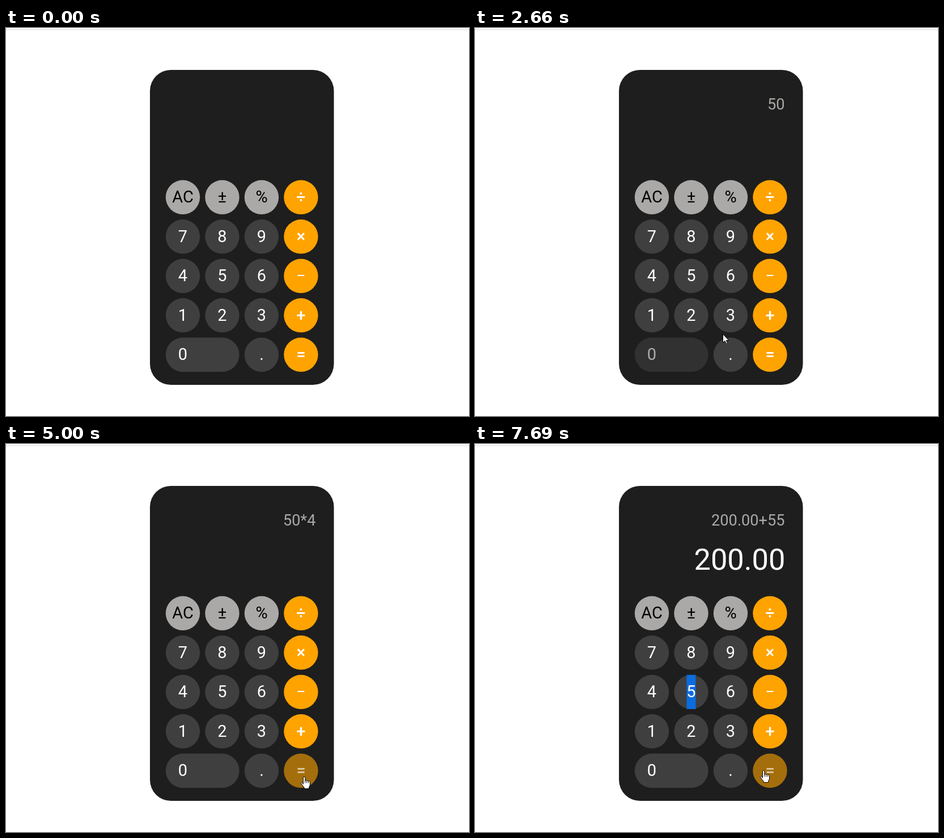
An HTML page with a canvas for the animation above (8000 ms loop, 817x685 px).

```html
<!DOCTYPE html>
<html lang="en">
<head>
<meta charset="utf-8">
<title>Calculator</title>
<style>
  html, body { margin: 0; width: 100%; height: 100%; overflow: hidden; background: #fff; }
  canvas { display: block; }
</style>
</head>
<body>
<canvas id="stage" width="817" height="685"></canvas>
<script>
const ctx = document.getElementById('stage').getContext('2d');
const LOOP = 8000;
const FONT = 'Roboto, Arial, sans-serif';
const ORANGE = '#ffa300', GRAY = '#aaa9a7', DARK = '#3f3f3f', BODY = '#1e1e1e';
const SIZE = 60.4, PITCH = 69.5, LEFT = 281.8, TOP = 268.6;

const ROWS = ['A±%÷', '789×', '456−', '123+', '0 .='];
const keys = [];
ROWS.forEach((line, row) => [...line].forEach((id, col) => {
  if (id === ' ') return;
  const kind = col === 3 ? 'op' : row === 0 ? 'fn' : 'num';
  keys.push({ id, kind, x: LEFT + col * PITCH, y: TOP + row * PITCH,
    w: id === '0' ? SIZE + PITCH : SIZE });
}));

// time, pointer shape, hotspot x, y, hovered key, pressed key
const POINTER = [
  [0, '', 0, 0],
  [330, 'arrow', 491, 529],
  [660, 'arrow', 410, 446],
  [1000, 'hand', 378, 430, '5'],
  [1330, 'hand', 378, 430, '', '5'],
  [1660, 'hand', 369, 560, '0'],
  [1990, 'hand', 369, 567, '0'],
  [2330, 'hand', 369, 567, '', '0'],
  [2660, 'arrow', 437, 540, '0'],
  [2990, 'hand', 521, 430, '−'],
  [3340, 'hand', 534, 370, '', '×'],
  [3670, 'arrow', 462, 401],
  [4010, 'arrow', 433, 403],
  [4340, 'hand', 319, 437, '4'],
  [4660, 'hand', 320, 441, '4'],
  [5000, 'hand', 526, 587, '='],
  [5350, 'hand', 529, 590, '='],
  [5690, 'hand', 509, 557, '='],
  [6020, 'hand', 508, 517, '+'],
  [6350, 'hand', 517, 507, '+'],
  [6690, 'hand', 450, 494, '3'],
  [7030, 'hand', 369, 433, '5'],
  [7360, 'hand', 369, 433, '', '5'],
  [7690, 'hand', 509, 576, '=']
];
const ENTRY = [
  [0, ''], [1660, '5'], [2660, '50'], [3670, '50*'], [4660, '50*4'],
  [5350, '200.00'], [6690, '200.00+'], [7360, '200.00+5'], [7690, '200.00+55']
];
const RESULT = [[0, ''], [5350, '200.00']];
const SELECT_AT = 7360;

const ARROW = new Path2D('M.5 .5V15.5L4 12.3L6.4 17.5L8.6 16.5L6.3 11.5H10.8Z');
const HAND = new Path2D('M4.5 13.5V2a1.7 1.7 0 0 1 3.4 0V7.5a1.5 1.5 0 0 1 2.9 .6' +
  'a1.5 1.5 0 0 1 2.9 .6a1.5 1.5 0 0 1 2.8 .8V14q0 3-1.8 4.8V21.5H6.2V19.5L1 13' +
  'q-1-1.8 .6-2.4q1.2-.4 2.9 2.9z');
const KNUCKLES = new Path2D('M7.9 7V11.5M10.8 8V11.5M13.7 9V11.5');

const at = (list, t) => list.findLast(step => step[0] <= t);

function box(x, y, w, h, r, color) {
  ctx.fillStyle = color;
  ctx.beginPath();
  ctx.roundRect(x, y, w, h, r);
  ctx.fill();
}

function text(str, x, y, size, color, align, weight = 400) {
  ctx.font = `${weight} ${size}px ${FONT}`;
  ctx.textAlign = align;
  ctx.fillStyle = color;
  ctx.fillText(str, x, y);
}

function keyColor(kind, down) {
  if (kind === 'num') return down ? ORANGE : DARK;
  return kind === 'op' && !down ? ORANGE : GRAY;
}

function drawKey(key, over, down, selected) {
  const { id, kind, x, y, w } = key;
  const cx = x + SIZE / 2;
  ctx.globalAlpha = over ? 0.6 : 1;
  box(x, y, w, SIZE, SIZE / 2, keyColor(kind, down));
  if (selected) {
    ctx.fillStyle = '#0b6cdf';
    ctx.fillRect(cx - 8, y, 16, SIZE);
  }
  const weight = kind === 'op' && id !== '−' ? 500 : 400;
  text(id === 'A' ? 'AC' : id, cx, y + SIZE / 2 + 9.6, 29,
    kind === 'fn' ? '#000' : '#fff', 'center', weight);
  ctx.globalAlpha = 1;
}

function drawPointer(shape, x, y, down) {
  if (!shape) return;
  if (down) box(x - 15, y - 15, 29, 29, 14.5, 'rgba(255,240,0,.55)');
  const hand = shape === 'hand';
  const path = hand ? HAND : ARROW;
  ctx.save();
  ctx.translate(hand ? x - 6 : x, y);
  ctx.fillStyle = '#fff';
  ctx.strokeStyle = '#000';
  ctx.lineWidth = 1;
  ctx.fill(path);
  ctx.stroke(path);
  if (hand) ctx.stroke(KNUCKLES);
  ctx.restore();
}

function draw(t) {
  const [, shape, x, y, over, down] = at(POINTER, t);
  ctx.fillStyle = '#fff';
  ctx.fillRect(0, 0, 817, 685);
  ctx.fillStyle = '#d8d8d8';
  ctx.fillRect(0, 2.5, 817, 1);
  box(254, 74, 324.6, 556, 37, BODY);
  text(at(ENTRY, t)[1], 546.6, 144, 27.2, GRAY, 'right');
  text(at(RESULT, t)[1], 547.5, 222, 52.4, '#fff', 'right');
  for (const key of keys) {
    drawKey(key, key.id === over, key.id === down, key.id === '5' && t >= SELECT_AT);
  }
  drawPointer(shape, x, y, down);
}

const start = performance.now();
function tick() {
  draw((performance.now() - start) % LOOP);
  requestAnimationFrame(tick);
}
tick();
</script>
</body>
</html>
```
